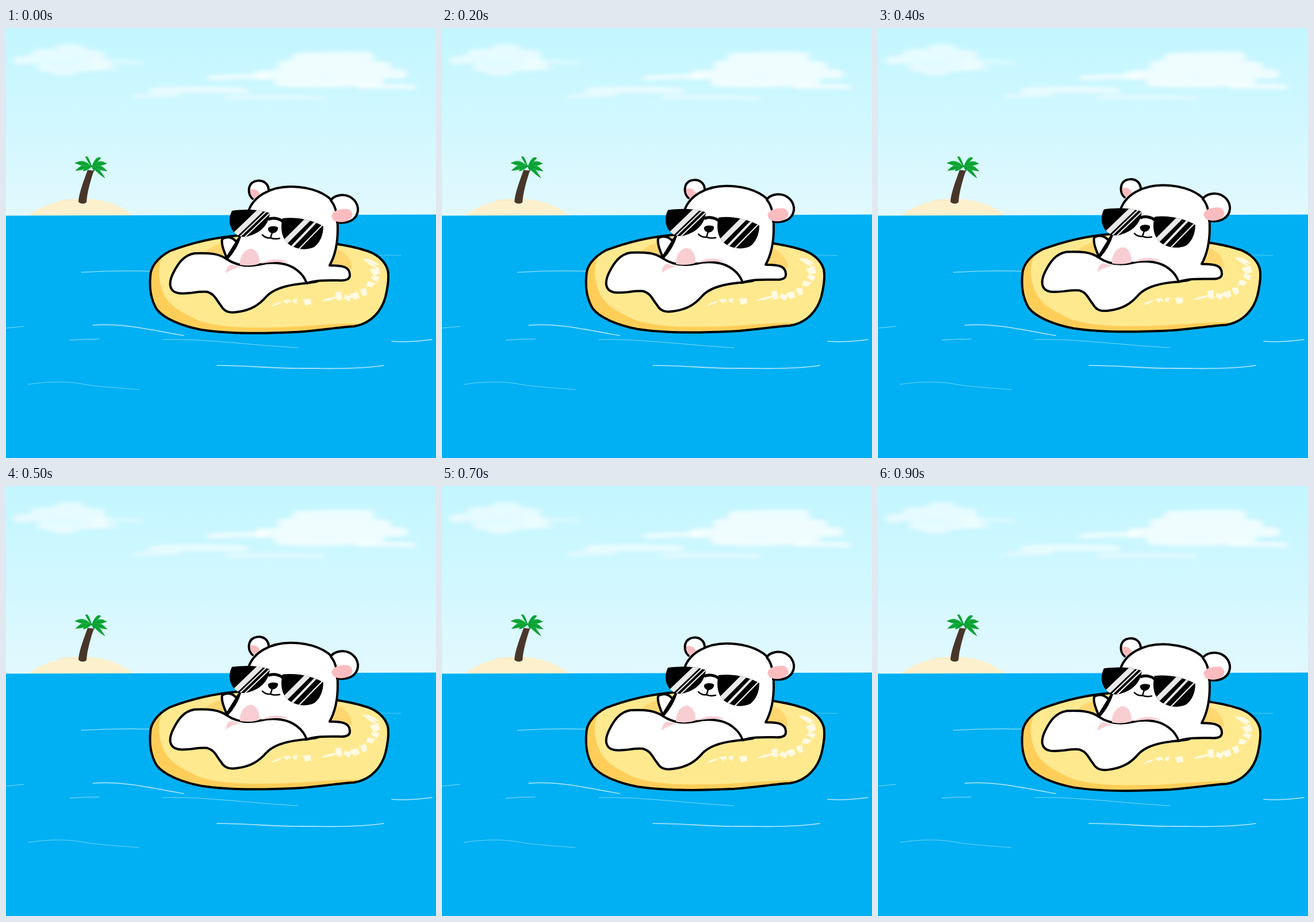
Animation, 748 px wide and 748 px high, one loop 1000 ms. Source, as an HTML page:

```html
<!DOCTYPE html>
<html lang="en">
<head>
<meta charset="utf-8">
<title>Floating bear</title>
<style>
html, body { margin: 0; width: 100%; height: 100%; overflow: hidden; }
svg { display: block; width: 100vw; height: 100vh; }
.ink { stroke: #000; stroke-width: 4; stroke-linejoin: round; stroke-linecap: round; }
.wave { fill: none; stroke: #b4e7fb; stroke-width: 1.1; stroke-linecap: round; }
.cloud { fill: none; stroke: #fff; stroke-linecap: round; }
.glare { fill: none; stroke: #e9e9e9; }
</style>
</head>
<body>
<svg viewBox="0 0 748 748">
  <defs>
    <linearGradient id="sky" x2="0" y2="1">
      <stop offset="0" stop-color="#c3f6ff"/>
      <stop offset=".4" stop-color="#cef7ff"/>
      <stop offset="1" stop-color="#e2f9fe"/>
    </linearGradient>
    <filter id="soft" filterUnits="userSpaceOnUse" x="-20" y="0" width="788" height="150"><feGaussianBlur stdDeviation="6 3"/></filter>
    <path id="ring" d="M404 361C366 364 322 374 285 388C263 400 251 416 251 433C249 456 253 474 262 489C274 505 304 518 340 525C378 531 440 532 503 529C540 527 574 521 605 519C637 514 654 490 660 468C665 447 666 430 664 421C659 404 643 391 622 386C607 381 590 378 570 375Z"/>
    <path id="lenses" d="M393 318C387 330 388 343 394 352C402 363 413 366 425 361C442 356 457 343 459 322C440 315 413 315 393 318ZM481 331C502 328 533 333 552 345C552 360 546 374 536 381C520 388 504 384 493 377C481 368 476 352 481 331Z"/>
    <clipPath id="ringClip"><use href="#ring"/></clipPath>
    <clipPath id="lensClip"><use href="#lenses"/></clipPath>
  </defs>

  <rect width="748" height="330" fill="url(#sky)"/>
  <g class="cloud" filter="url(#soft)">
    <path stroke-width="15" opacity=".55" d="M20 57Q90 48 165 56M52 45Q110 40 165 47M62 68Q120 72 175 64M95 36H128M85 75H115"/>
    <path stroke-width="9" opacity=".3" d="M150 58Q200 58 235 61M150 70H190"/>
    <path stroke-width="16" opacity=".7" d="M440 82Q560 76 690 80M480 65Q570 60 662 67M505 52Q570 48 632 50M475 94Q560 99 650 90"/>
    <path stroke-width="8" opacity=".7" d="M355 87Q400 84 450 84M615 102Q670 100 708 103"/>
    <path stroke-width="11" opacity=".55" d="M255 109Q320 105 415 109"/>
    <path stroke-width="8" opacity=".4" d="M222 119Q260 117 300 116M385 122Q460 118 550 122"/>
  </g>

  <path fill="#fcf0cd" d="M38 328C60 309 92 298 130 297C172 296 204 311 224 328Z"/>
  <path fill="none" stroke="#f8e6b8" d="M92 301C103 297 116 300 124 300"/>
  <path fill="#49362a" d="M142 247L153 248C147 265 141 287 140 303C136 307 128 306 126 302C127 287 135 266 142 247Z"/>
  <g id="fronds"></g>

  <path fill="#00b0f3" d="M0 326.500L748 324.500V748H0Z"/>
  <g class="wave">
    <path d="M131 425C165 423 210 422 252 423"/>
    <path opacity=".45" d="M650 395L687 395.500"/>
    <path opacity=".7" d="M0 522L31 519"/>
    <path stroke-width="1.500" d="M151 517C205 513 250 525 309 535"/>
    <path opacity=".8" d="M111 543Q136 541 162 541"/>
    <path opacity=".7" d="M273 542C350 540 435 553 508 556"/>
    <path stroke-width="1.500" d="M671 545C698 547 718 545 741 542"/>
    <path stroke-width="1.700" d="M367 587C430 587 465 593 535 592C585 593 625 592 657 587"/>
    <path opacity=".6" d="M38 620C72 615 107 614 137 620C167 625 200 626 232 629"/>
  </g>

  <g id="float">
    <use href="#ring" fill="#ffe98f"/>
    <g clip-path="url(#ringClip)">
      <path fill="#ffce59" d="M281 387C262 405 263 434 273 459C284 487 311 496 333 508C359 518 402 522 452 521C510 521 560 514 611 514L600 545H240V387Z"/>
      <path fill="#ffd670" d="M574 384C590 390 601 401 602 419L565 415ZM377 374C362 378 351 384 345 392L384 400Z"/>
    </g>
    <path fill="#fffae2" d="M620 402C631 400 642 405 649 413L640 411L647 418L636 414ZM632 420L648 416L651 427L640 431L650 433L646 442L634 435L639 429ZM629 440L643 444L636 451L626 449L628 464L621 467L615 455L625 453ZM600 462L612 459L615 469L607 473L601 468L597 476L587 470L590 463L597 466ZM573 460L583 458L585 473L577 474L575 470L562 474L547 476L556 471L574 467ZM516 472L530 471L531 480L521 483ZM500 472L507 471L505 480L499 477ZM481 474L494 472L496 478L490 477L490 481ZM460 485Q469 477 480 476L476 480Z"/>
    <use href="#ring" class="ink" fill="none"/>

    <g class="ink" fill="#fff">
      <path d="M384 400C380 390 374 377 376 367C382 363 393 362 401 372L407 363Z"/>
      <path d="M429 297C420 289 420 272 432 267C447 262 458 271 457 285"/>
    </g>
    <path fill="#fbbcc0" d="M425 281C433 278 441 284 442 290L432 297C426 293 424 287 425 281Z"/>
    <path class="ink" fill="#fff" d="M407 363C402 379 394 391 384 402L400 430L523 444C540 438 560 439 578 439C594 440 599 436 598 428C597 416 587 413 563 413C573 395 577 375 577 350C577 328 575 309 566 299C548 282 520 276 495 276C461 276 431 292 422 318Z"/>
    <path class="ink" fill="#fff" d="M565 300C570 291 586 288 597 293C611 300 616 315 609 327C602 338 588 340 576 338C576 322 572 308 565 300Z"/>
    <path fill="#fbbcc0" d="M566 327C569 316 584 314 595 315C602 318 605 325 600 331C592 339 580 339 570 335Z"/>
    <path class="ink" fill="#fff" d="M384 402C370 392 353 391 328 392C309 395 299 410 291 426C282 444 284 458 299 461C317 464 333 457 350 459C364 463 366 474 374 483C380 494 389 496 402 494C426 491 440 482 453 467C466 453 492 446 523 444C519 432 510 423 500 417C483 407 458 407 443 411C420 416 400 413 384 402Z"/>
    <path class="ink" fill="none" d="M523 444C530 442 537 443 543 440"/>
    <path fill="#f8ced2" d="M407 412C406 396 416 384 426 384C436 385 442 397 441 410C430 414 418 414 407 412ZM443 410C458 401 479 400 492 408C476 406 460 407 443 410ZM382 427C383 418 387 411 393 412L408 416Q392 419 382 427Z"/>

    <use href="#lenses"/>
    <g class="glare" clip-path="url(#lensClip)">
      <path stroke-width="9" d="M447 313L396 362M530 328L482 376"/>
      <path stroke-width="4" d="M544 332L496 382"/>
      <path stroke-width="2.200" d="M455 317L404 366M461 320L410 369M553 340L506 388"/>
    </g>
    <path fill="none" stroke="#000" stroke-width="5" d="M456 333C464 329 475 331 482 337"/>
    <path d="M456 348C459 344 469 344 473 347C474 352 469 357 463 357C458 356 455 352 456 348Z"/>
    <path fill="none" stroke="#000" stroke-width="2.500" stroke-linecap="round" d="M463 356L460 365M446 360Q452 366 460 365Q467 368 476 366"/>
  </g>
</svg>
<script>
const $ = id => document.getElementById(id);

// Each frond arches from the crown to its tip.
const [cx, cy] = [149, 241];
const tips = [[138, 224], [120, 235], [121, 248], [134, 249], [165, 226], [175, 236], [176, 249], [172, 261], [154, 249]];
$('fronds').innerHTML = tips.map(([x, y]) => {
  const mx = (x + cx) / 2, my = (y + cy) / 2;
  const arch = bend => `Q${mx} ${my + bend} `;
  return `<path fill="#10ad3a" d="M${cx} ${cy}${arch(-13)}${x} ${y}${arch(4)}${cx} ${cy}Z"/>
    <path fill="none" stroke="#087c2c" d="M${cx} ${cy}${arch(-4)}${x} ${y}"/>`;
}).join('');

const loop = 1000, step = 100, rise = 3.2;
function draw() {
  const k = Math.floor(performance.now() % loop / step);
  const lift = rise * (1 - Math.abs(k - 5) / 5);
  $('float').setAttribute('transform', `translate(0 ${-lift})`);
  requestAnimationFrame(draw);
}
draw();
</script>
</body>
</html>
```
